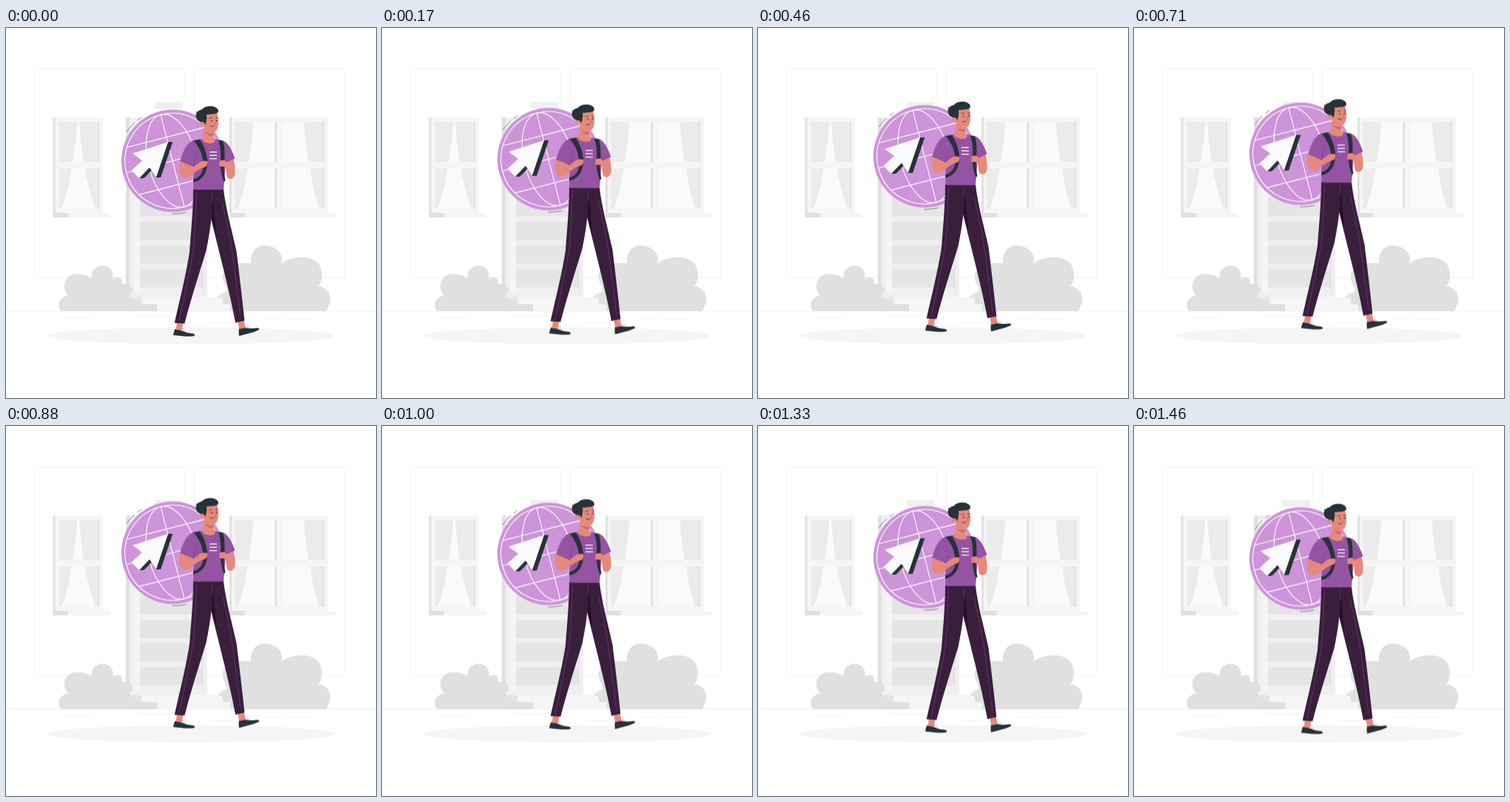
An HTML page that plays this animation: 500x500 px, repeating every 1500 ms.

```html
<!DOCTYPE html>
<html lang="en">
<head>
<meta charset="utf-8">
<title>Student</title>
<style>
  html, body { margin: 0; width: 100%; height: 100%; overflow: hidden; background: #fff; }
  svg { display: block; width: 100vw; height: 100vh; }
  .float { animation: float 1.5s linear infinite; }
  @keyframes float { 50% { transform: translateY(-10px); } }
  .light { fill: #f5f5f5; }
  .mid { fill: #ebebeb; }
  .dark { fill: #e0e0e0; }
  .pale { fill: #fafafa; }
  .ink { fill: #263238; }
  .skin { fill: #e4897b; }
  .shirt { fill: #9553a3; }
  .pants { fill: #3a1f3d; }
  .line { fill: none; stroke-linecap: round; stroke-linejoin: round; }
</style>
</head>
<body>
<svg viewBox="0 0 500 500">
  <!-- house -->
  <g fill="none" stroke="#f3f3f3">
    <rect x="38.5" y="55.5" width="203.5" height="282" rx="3"/>
    <rect x="254.5" y="55.5" width="203.5" height="282" rx="3"/>
    <path d="M0 382.5H500" stroke="#ebebeb" stroke-width=".8"/>
    <path d="M76 391.3H118M177 389.3H224M273 397.8H306M352 393.5H367M376 393.5H414" stroke="#efefef" stroke-width=".8"/>
  </g>

  <!-- left window -->
  <path class="light" d="M66 121H131V250H141V256H84V250H66Z"/>
  <path class="dark" d="M63.5 121H66.5V250H84V256H63.5Z"/>
  <path class="mid" d="M72 127H126V181H72ZM72 190H126V244H72Z"/>
  <path class="pale" d="M96 127H99Q101 155 105 181H90Q95 154 96 127ZM88.500 190H106.500Q112 220 121 244H75.500Q84 220 88.500 190Z"/>
  <path class="dark" d="M124 127H126V181H124ZM124 190H126V244H124Z"/>

  <!-- right window -->
  <path class="light" d="M305 121H435V250H445V256H322V250H305Z"/>
  <path class="dark" d="M302 121H305V250H322.500V256H302Z"/>
  <path class="mid" d="M310 127H366V181H310ZM310 190H366V244H310ZM373.500 127H430V181H373.500ZM373.500 190H430V244H373.500Z"/>
  <path class="pale" d="M334 127H363V181H328Q333 154 334 127ZM326.500 190H363V244H314Q322 220 326.500 190ZM373.500 127H403Q404 154 409 181H373.500ZM411 190Q415 220 423 244H373.500V190Z"/>
  <path class="dark" d="M363.500 127H366V181H363.500ZM363.500 190H366V244H363.500ZM427.500 127H430V181H427.500ZM427.500 190H430V244H427.500Z"/>

  <!-- door -->
  <rect x="201" y="100" width="37.500" height="9" fill="#f0f0f0"/>
  <rect x="167" y="121" width="105" height="253" fill="#f0f0f0"/>
  <rect class="dark" x="162" y="121" width="5" height="253"/>
  <rect class="light" x="173" y="127" width="94" height="231"/>
  <rect x="181" y="127" width="86" height="231" fill="#f0f0f0"/>
  <g fill="#e5e5e5">
    <rect x="181" y="135" width="84" height="84"/>
    <rect x="181" y="229" width="84" height="25.500"/>
    <rect x="181" y="262" width="84" height="25"/>
    <rect x="181" y="293.500" width="84" height="25"/>
    <rect x="181" y="326" width="84" height="24.500"/>
    <rect x="265" y="127" width="2" height="231"/>
  </g>
  <path class="light" d="M183 363.500H293V373H315V382.500H204V373H183Z"/>
  <path class="dark" d="M162 363.500H183V373H204V382.500H162Z" opacity=".75"/>
  <path class="dark" d="M172 373H204V382.500H172Z"/>

  <!-- bushes -->
  <path class="dark" d="M75 382.500C69 378 69 365 84 361C75 353 77 333 96 332.500Q107 332.500 116 338C113 322 132 317 141 325Q146 331 144 339C151 334 159 338 156.500 346C167 343 175 353 168 360Q165 363 166 366C176 364 181 374 174 382.500Z"/>
  <path fill="#e6e6e6" d="M286 363Q291 357 299 356V365H286Z"/>
  <path class="dark" d="M293 382.500V361C300 358 299 352 295 345C287 326 302 316 331 318C330 302 339 293 350 294C366 295 375 304 372.500 318C390 306 416 307 424 321Q431 336 422 349C435 350 441 362 437 373Q435 379 432 382.500Z"/>
  <path class="light" d="M272 373H303V382.500H272Z"/>
  <ellipse class="light" cx="250" cy="416" rx="193.500" ry="11.500"/>

  <g class="float">
    <!-- globe -->
    <circle cx="225.200" cy="179.500" r="69.300" fill="#cd94d9"/>
    <g class="line" stroke="#fff" stroke-width="1.100" transform="translate(225 179.500) rotate(-14.400)">
      <circle r="64.300"/>
      <ellipse rx="33" ry="64.300"/>
      <path d="M0-64.300V64.300M-64.300 0H64.300M-55-33H55M-55 33H55"/>
    </g>
    <path class="line" stroke="#65506b" stroke-width=".7" d="M163.500 139.500Q168 133 173.500 128M178 124.500L183 121M225 251.200Q234 251.400 243 249.300"/>
    <path class="ink" d="M219 154H225.300L209 202H202.500ZM180 203H186.300L197 192L194 188Z"/>
    <path class="pale" d="M219 154L171 169.500L184 179L169.500 192.500L180 203L194 188.500L203 201.500Z"/>

    <!-- legs and shoes -->
    <path class="skin" d="M231 397H239.500L237.500 410H229.500ZM313 395L321.500 394L324 407L315.500 409Z"/>
    <path class="ink" d="M228.500 406.800Q232 409 237 408.500Q242 412 252 412.700Q256 413.500 254.700 416Q252 417.300 240 416.500L226 415Q226.500 410 228.500 406.800ZM314.800 406.300Q319 407 323.500 404.800Q330 407 340 405.200Q343 406 341.500 408Q334 412 325 413.500L315 416.200Q314 411 314.800 406.300Z"/>
    <path class="line" stroke="#cd94d9" stroke-width=".8" d="M236 408L241 405.500M237 409L242 409.500M323 405L326 402.500M324 405.500L329 404"/>
    <path class="pants" d="M277 218H294C297 245 305 272 311.500 302Q317 346 322.300 395.500L310 398.300C301 350 287 300 276 253Z"/>
    <path d="M277 221H279L284 278L275 250Z" fill="#251128"/>
    <path class="pants" d="M253 217H279C280 246 276 275 270.500 301C261 332 250 366 241.300 399.500L227.700 398.500C235 366 243 335 248 303C250 275 253 246 253 217Z"/>
    <path class="line" stroke="#75477e" stroke-width=".6" d="M257.500 222C256 250 256 275 253 302Q245 345 234 396M279 222Q279 229 278 235M292 235Q305 290 308 320L317 390"/>

    <!-- torso -->
    <path class="skin" d="M236 178Q232 192 237 200Q242 205 249 200L265 189Q273 188 272.500 180Q268 178.500 264 181L250 189L253 178ZM296 178L299 186L297 187Q290 189 288.500 185V179Q292 177.500 296 178Z"/>
    <path class="skin" d="M297 178L307 175Q311 191 309 200Q304 207 299 202Q297 195 297 185Z"/>
    <path class="shirt" d="M253 152Q265 150 269 149L282 150L293 152C300 154 306 166 309.500 176.500L297 182L294 218.500H253.500Q253 204 254 188L249.500 186L235.300 180C238 169 244 155 253 152Z"/>
    <path class="line" stroke="#743b81" stroke-width=".7" d="M253 187Q254 180 258 174M297 181Q296 175 294 169"/>
    <path class="skin" d="M267.500 134L281 139Q279 146 282.500 151Q284 156 275 156Q267 155 264.500 151Q268 145 267.500 134Z"/>
    <path d="M270 141Q276 144 280 143L279.500 146Q273 147 270 141Z" fill="#c96d64"/>
    <path class="line" stroke="#fff" stroke-width="1.300" d="M275.500 167.700H284.500M275.500 172.200H284.500M275.500 176.700H284.500"/>
    <path class="ink" d="M253.500 152L262 150.500Q270 163 272 178C273 195 266 206 253 208.500V204.500C266 201 268 189 266 178Q264 164 253.500 152ZM287 151.500L293 152.500Q296.500 162 295 180Q293.500 195 296.500 206L294.500 208Q289 195 290 179Q291 163 287 151.500Z"/>
    <path class="skin" d="M248 192L262 181Q267 178.500 272 180Q273 188 267 188.500Q262 190 254 196ZM288.500 180Q292 177.500 296 179L299 183V188Q292 187 288.500 187Z"/>

    <!-- head -->
    <path class="skin" d="M268 116L285 114C288 123 288 133 284.500 138.500Q281 143 275 141Q268 138 267 131Q262 133 261.500 128Q263 124 267 126Z"/>
    <path class="ink" d="M265 127Q258 127 256.500 119Q256.500 112 265 110Q267 106 276 105.500Q286 106 287 112Q287 115 282 116L271 117Q272 122 269.500 131Q268 127 265 127ZM256 114Q259 112 264 113L263 116Z"/>
    <path class="line" stroke="#263238" stroke-width=".8" d="M275 122Q276.500 120.500 278.500 121.500M283.500 121Q285 120.500 286 121.500M276 132.500Q278.500 134 281 132"/>
    <ellipse class="ink" cx="278" cy="125.500" rx=".8" ry="1.100"/>
    <ellipse class="ink" cx="284.500" cy="125" rx=".8" ry="1.100"/>
    <path class="line" stroke="#cf5f56" stroke-width=".8" d="M281.500 126Q283.500 129 283.500 130.500H281.500"/>
  </g>
</svg>
</body>
</html>
```
